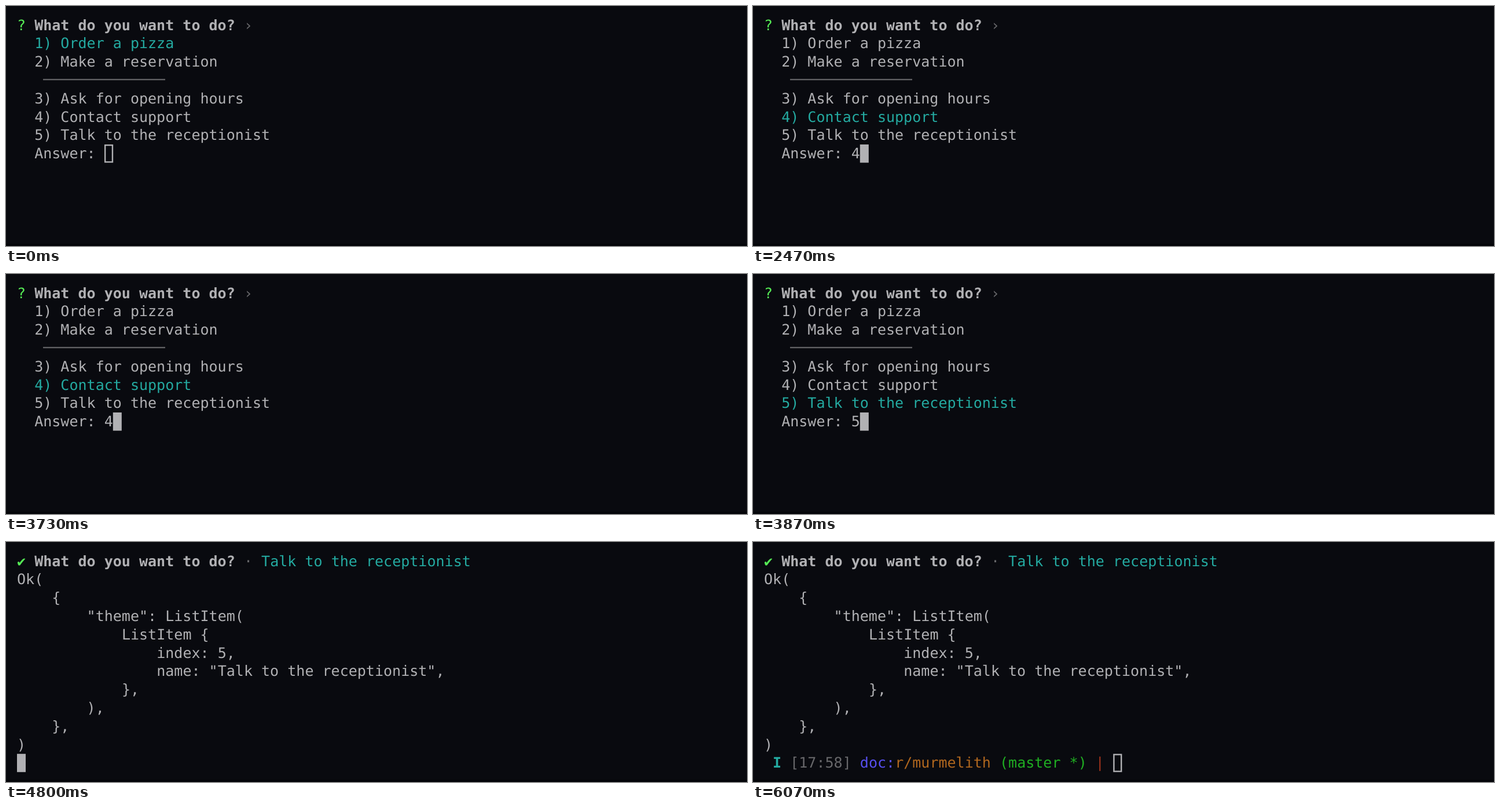
Animation of 1280 by 416 pixels, one loop 7070 ms. Source, as an HTML page:

```html
<!DOCTYPE html>
<html lang="en">
<head>
<meta charset="utf-8">
<title>Terminal menu</title>
<style>
  html, body { margin: 0; width: 100%; height: 100%; overflow: hidden; background: #090a0f; }
  svg { display: block; width: 1280px; height: 416px; }
  text {
    font: 25.04px "DejaVu Sans Mono", monospace;
    white-space: pre;
    text-rendering: geometricPrecision;
    fill: #b1b1b4;
  }
  .bold { font-weight: bold; }
  .teal { fill: #24aaa1; }
  .lime { fill: #55ea55; }
  .dim { fill: #67676a; }
  .blue { fill: #574ff0; }
  .orange { fill: #b0671e; }
  .green { fill: #1fae22; }
  .red { fill: #a1331c; }
  .block { fill: #b1b1b4; }
  .hollow { fill: none; stroke: #b1b1b4; stroke-width: 2.4; }

  /* Hard cuts within one 7.07 s loop */
  .menu, .pick1, .pick4, .pick5, .typed, .idle, .ready, .result, .fresh, .prompt, .active, .away {
    animation: 7.07s step-end infinite;
  }
  .menu { animation-name: menu; }
  .pick1 { animation-name: pick1; }
  .pick4 { animation-name: pick4; }
  .pick5 { animation-name: pick5; }
  .typed { animation-name: typed; }
  .idle { animation-name: idle; }
  .ready { animation-name: ready; }
  .result { animation-name: result; }
  .fresh { animation-name: fresh; }
  .prompt { animation-name: prompt; }
  .active { animation-name: active; }
  .away { animation-name: away; }
  @keyframes menu { 0% { opacity: 1 } 67.893%, 100% { opacity: 0 } }
  @keyframes pick1 { 0% { opacity: 1 } 34.936%, 100% { opacity: 0 } }
  @keyframes pick4 { 0% { opacity: 0 } 34.936% { opacity: 1 } 53.748%, 100% { opacity: 0 } }
  @keyframes pick5 { 0% { opacity: 0 } 53.748%, 100% { opacity: 1 } }
  @keyframes typed { 0% { opacity: 0 } 34.936%, 100% { opacity: 1 } }
  @keyframes idle { 0% { opacity: 1 } 13.154%, 100% { opacity: 0 } }
  @keyframes ready { 0% { opacity: 0 } 13.154% { opacity: 1 } 34.936%, 100% { opacity: 0 } }
  @keyframes result { 0% { opacity: 0 } 67.893%, 100% { opacity: 1 } }
  @keyframes fresh { 0% { opacity: 0 } 67.893% { opacity: 1 } 68.883%, 100% { opacity: 0 } }
  @keyframes prompt { 0% { opacity: 0 } 68.883%, 100% { opacity: 1 } }
  @keyframes active { 0% { opacity: 1 } 83.876%, 100% { opacity: 0 } }
  @keyframes away { 0% { opacity: 0 } 83.876%, 100% { opacity: 1 } }
</style>
</head>
<body>
<svg id="screen" viewBox="0 0 1280 416"></svg>
<script>
const LEFT = 19, TOP = 17.4, CELL = 15.075, ROW = 31.8, BASE = 24.15;
const colX = col => LEFT + col * CELL;
const rowY = row => TOP + row * ROW;

const group = (name, ...parts) => `<g class="${name}">${parts.join("")}</g>`;
const text = (row, col, str, style = "") =>
  `<text class="${style}" x="${colX(col).toFixed(2)}" y="${(rowY(row) + BASE).toFixed(2)}">${str}</text>`;
const block = (row, col) =>
  `<rect class="block" x="${colX(col).toFixed(2)}" y="${rowY(row).toFixed(2)}" width="15" height="31.6"/>`;
const hollow = (row, col) =>
  `<rect class="hollow" x="${(colX(col) + 1.4).toFixed(2)}" y="${(rowY(row) + 1.2).toFixed(2)}" width="12.8" height="29.2"/>`;

const choice = "Talk to the receptionist";
const item1 = "1) Order a pizza";
const item4 = "4) Contact support";
const item5 = "5) " + choice;

// Each selectable row swaps between a plain and a highlighted copy.
const menu = group("menu",
  text(0, 0, "?", "lime"),
  text(0, 26, "›", "dim"),
  group("pick1", text(1, 2, item1, "teal")),
  group("typed", text(1, 2, item1)),
  text(2, 2, "2) Make a reservation"),
  `<rect fill="#707073" x="64" y="126.5" width="211" height="2"/>`,
  text(4, 2, "3) Ask for opening hours"),
  group("pick1", text(5, 2, item4)),
  group("pick4", text(5, 2, item4, "teal")),
  group("pick5", text(5, 2, item4)),
  group("pick1", text(6, 2, item5)),
  group("pick4", text(6, 2, item5)),
  group("pick5", text(6, 2, item5, "teal")),
  text(7, 2, "Answer:"),
  group("idle", hollow(7, 10)),
  group("ready", block(7, 10)),
  group("pick4", text(7, 10, "4")),
  group("pick5", text(7, 10, "5")),
  group("typed", block(7, 11))
);

const output = [
  [0, "Ok("],
  [4, "{"],
  [8, '"theme": ListItem('],
  [12, "ListItem {"],
  [16, "index: 5,"],
  [16, `name: "${choice}",`],
  [12, "},"],
  [8, "),"],
  [4, "},"],
  [0, ")"]
];

const result = group("result",
  text(0, 0, "✔", "lime"),
  text(0, 26, "·", "dim"),
  text(0, 28, choice, "teal"),
  ...output.map(([col, str], i) => text(i + 1, col, str)),
  group("fresh", block(11, 0)),
  group("prompt",
    text(11, 1, "I", "bold teal"),
    text(11, 3, "[17:58]", "dim"),
    text(11, 11, "doc:", "blue"),
    text(11, 15, "r/murmelith", "orange"),
    text(11, 27, "(master *)", "green"),
    text(11, 38, "|", "red"),
    group("active", block(11, 40)),
    group("away", hollow(11, 40))
  )
);

document.getElementById("screen").innerHTML =
  `<rect width="1280" height="416" fill="#090a0f"/>` +
  `<rect y="412" width="1280" height="4" fill="#040509"/>` +
  text(0, 2, "What do you want to do?", "bold") + menu + result;
</script>
</body>
</html>
```
